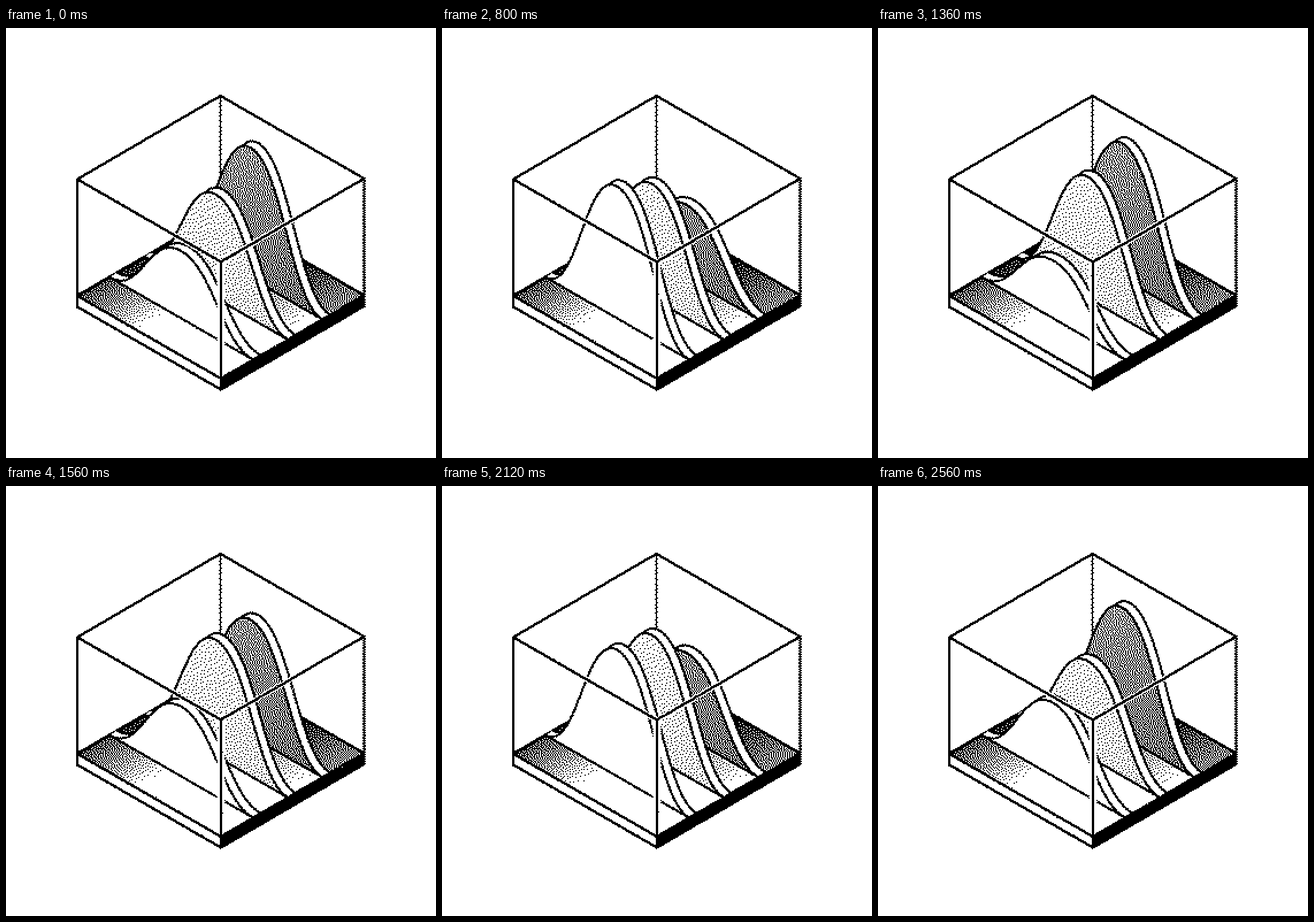
An HTML page with a canvas for the animation above (2.6 s loop, 748x748 px).

```html
<!DOCTYPE html>
<html lang="en">
<head>
<meta charset="utf-8">
<title>Three waves in a box</title>
<style>
  html, body { margin: 0; height: 100%; overflow: hidden; background: #fff; }
  canvas { display: block; width: 100vw; height: 100vh; image-rendering: pixelated; }
</style>
</head>
<body>
<canvas id="stage" width="374" height="374"></canvas>
<script>
const SIZE = 374, LOOP = 2600, STEP = 40;
const LID = 203, SLAB = 19, CURVE = 4, EDGE = 4.2;
const ctx = document.getElementById('stage').getContext('2d', { willReadFrequently: true });

// Floor coordinates u (to the front right), v (to the back right) and height to stage pixels
const project = (u, v, h = 0) => [124 + 249 * v + 250 * u, 466 - 145 * v + 144 * u - h];
const corners = h => ({
  left: project(0, 0, h), front: project(1, 0, h), right: project(1, 1, h), back: project(0, 1, h),
});
const lid = corners(LID), floor = corners(0), base = corners(-SLAB);

// Back to front; swings are [amplitude, phase in degrees] for 2, 3 and 4 beats per loop
const ridges = [
  { v: .71, shade: [.4, .6], mean: 183, swings: [[53, 11], [8, 130], [4, 217]] },
  { v: .468, shade: [.07, .15], mean: 193, swings: [[42, 127], [10, 150], [27, 38]] },
  { v: .225, shade: [0, 0], mean: 164, swings: [[61, 226], [6, 320], [9, 180]] },
];

const heightAt = ({ mean, swings }, t) => swings.reduce((sum, [amp, phase], i) =>
  sum + amp * Math.cos(2 * Math.PI * ((i + 2) * t / LOOP - phase / 360)), mean);

const grey = shade => `rgb(${Array(3).fill(Math.round(255 * (1 - shade)))})`;

function trace(points) {
  ctx.beginPath();
  points.forEach(p => ctx.lineTo(...p));
}
function line(points, width = EDGE, color = '#000') {
  trace(points);
  ctx.lineWidth = width;
  ctx.strokeStyle = color;
  ctx.stroke();
}
function fill(points, style) {
  trace(points);
  ctx.fillStyle = style;
  ctx.fill();
}

// Bell profile with flat feet
function bump(u) {
  const f = Math.sin(Math.PI * u) ** 2;
  return .7 * f + .3 * f * f * (3 - 2 * f);
}

// Each lane fades along u from black to white, later the further back it lies
function drawFloor() {
  const bounds = [0, ...ridges.map(r => r.v).reverse(), 1];
  ctx.save();
  ctx.transform(250, 144, 249, -145, 124, 466);
  for (let i = 0; i < 4; i++) {
    const g = ctx.createLinearGradient(.07 * i * i - .14, 0, .42 + .15 * i + .06 * i * i, 0);
    g.addColorStop(0, '#000');
    g.addColorStop(1, '#fff');
    ctx.fillStyle = g;
    ctx.fillRect(0, bounds[i], 1, bounds[i + 1] - bounds[i]);
  }
  ctx.restore();
  line([floor.left, floor.back, floor.right]);
}

function drawRidge(ridge, t) {
  const height = heightAt(ridge, t), front = [];
  for (let i = 0; i <= 80; i++) front.push(project(i / 80, ridge.v, height * bump(i / 80)));
  const back = front.map(([x, y]) => [x + 13, y - 8]);
  fill([...front, ...back.slice().reverse()], '#fff');
  line(back, CURVE);
  const g = ctx.createLinearGradient(0, 200, 0, 510);
  ridge.shade.forEach((s, i) => g.addColorStop(i, grey(s)));
  fill(front, g);
  line(front, CURVE);
  line([front[0], front[80]], CURVE);
}

function drawFrontOfBox() {
  line([lid.left, lid.front, lid.right], 9, '#fff');
  line([lid.front, project(1, 0, 10)], 14, '#fff');
  fill([floor.left, floor.front, base.front, base.left], '#fff');
  fill([floor.front, floor.right, base.right, base.front], '#000');
  line([lid.left, lid.back, lid.right, lid.front, lid.left, base.left, base.front, base.right, lid.right]);
  line([floor.left, floor.front, floor.right]);
  line([lid.front, base.front]);
}

// Seeded grain, the same on every draw
const grain = Float32Array.from({ length: SIZE * SIZE }, (_, i) => {
  const n = Math.sin(i * 12.9898) * 43758.5453;
  return n - Math.floor(n) - .5;
});

// One-bit error diffusion gives the stippled shading
function stipple() {
  const image = ctx.getImageData(0, 0, SIZE, SIZE);
  const pixels = new Uint32Array(image.data.buffer);
  const tone = Float32Array.from(pixels, p => p & 255);
  for (let i = 0; i < tone.length; i++) {
    const on = tone[i] > 127 + 60 * grain[i];
    const error = (tone[i] - (on ? 255 : 0)) / 16;
    pixels[i] = on ? 0xffffffff : 0xff000000;
    tone[i + 1] += error * 7;
    tone[i + SIZE - 1] += error * 3;
    tone[i + SIZE] += error * 5;
    tone[i + SIZE + 1] += error;
  }
  ctx.putImageData(image, 0, 0);
}

function draw(t) {
  ctx.setTransform(.5, 0, 0, .5, 0, 0);
  ctx.lineJoin = 'round';
  ctx.fillStyle = '#fff';
  ctx.fillRect(0, 0, 2 * SIZE, 2 * SIZE);
  line([lid.back, floor.back], 3);
  drawFloor();
  ridges.forEach(ridge => drawRidge(ridge, t));
  drawFrontOfBox();
  stipple();
}

let shown = -1;
function tick() {
  const t = Math.floor(performance.now() % LOOP / STEP) * STEP;
  if (t !== shown) draw(shown = t);
  requestAnimationFrame(tick);
}
tick();
</script>
</body>
</html>
```
